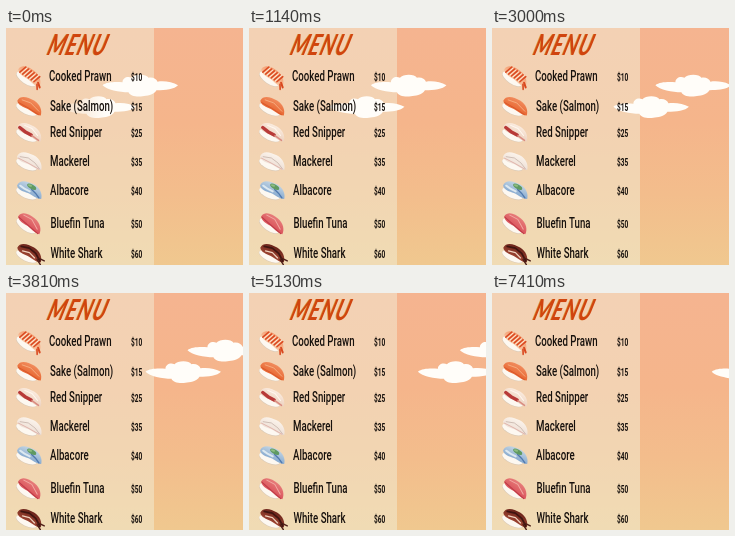
Recreate the animation shown at these times as an HTML page with a canvas. Size 237 by 237 pixels, loop 7470 ms.

```html
<!DOCTYPE html>
<html lang="en">
<head>
<meta charset="utf-8">
<title>Menu</title>
<style>
html, body { margin: 0; width: 100%; height: 100%; overflow: hidden; background: #f3bd90; }
canvas { display: block; width: 237px; height: 237px; }
</style>
</head>
<body>
<canvas id="stage" width="237" height="237"></canvas>
<script>
const SIZE = 237, LOOP = 7470, SPEED = 0.0223;
const ctx = document.getElementById('stage').getContext('2d');

const ITEMS = [
  { name: 'Cooked Prawn', price: '$10', x: 43, y: 53, tilt: 0.6, icon: prawn },
  { name: 'Sake (Salmon)', price: '$15', x: 44, y: 83, tilt: 0.45, icon: salmon },
  { name: 'Red Snipper', price: '$25', x: 44, y: 109, tilt: 0.45, icon: snapper },
  { name: 'Mackerel', price: '$35', x: 44, y: 138, tilt: 0.4, icon: mackerel },
  { name: 'Albacore', price: '$40', x: 44, y: 167, tilt: 0.4, icon: albacore },
  { name: 'Bluefin Tuna', price: '$50', x: 44.5, y: 200, tilt: 0.6, icon: tuna },
  { name: 'White Shark', price: '$60', x: 44.5, y: 230, tilt: 0.45, icon: shark }
];

function sky(c) {
  const g = c.createLinearGradient(0, 0, 0, SIZE);
  g.addColorStop(0, '#f5b490');
  g.addColorStop(0.4, '#f5b58b');
  g.addColorStop(0.7, '#f3bd8c');
  g.addColorStop(1, '#f0c88f');
  c.fillStyle = g;
  c.fillRect(0, 0, SIZE, SIZE);
  c.fillStyle = 'rgba(241,240,218,0.5)';
  c.fillRect(0, 0, 148, SIZE);
}

function cloud(c, x, y) {
  c.save();
  c.translate(x, y);
  // Fainter toward the left of the menu panel
  const g = c.createLinearGradient(50 - x, 0, 100 - x, 0);
  g.addColorStop(0, 'rgba(255,253,249,0.2)');
  g.addColorStop(1, '#fffdf9');
  c.fillStyle = g;
  c.beginPath();
  c.moveTo(0, 10.5);
  c.bezierCurveTo(4, 7, 13, 7, 20, 7.5);
  c.bezierCurveTo(20, 3, 25, 1, 29, 3);
  c.bezierCurveTo(32, -1, 44, -1, 46, 3);
  c.bezierCurveTo(50, 2, 54, 4, 55, 7);
  c.bezierCurveTo(61, 6, 70, 7, 75.5, 10.5);
  c.bezierCurveTo(72, 14.5, 63, 15.5, 54, 15.5);
  c.bezierCurveTo(51, 20.5, 44, 21, 40, 21.5);
  c.bezierCurveTo(34, 22.5, 27, 21, 26, 17.5);
  c.bezierCurveTo(17, 17.5, 4, 15, 0, 10.5);
  c.fill();
  c.restore();
}

function line(c, color, width, pts) {
  c.strokeStyle = color;
  c.lineWidth = width;
  c.beginPath();
  pts.forEach(([x, y], i) => i ? c.lineTo(x, y) : c.moveTo(x, y));
  c.stroke();
}

function oval(c, color, x, y, rx, ry, turn = 0) {
  c.fillStyle = color;
  c.beginPath();
  c.ellipse(x, y, rx, ry, turn, 0, Math.PI * 2);
  c.fill();
}

function rice(c) {
  oval(c, '#dccbb7', -1, 4.2, 11.4, 4.7);
  oval(c, '#fdf8f1', -1, 3.6, 11.2, 4.6);
}

function slab(c, top, bottom) {
  const g = c.createLinearGradient(0, -7, 0, 4);
  g.addColorStop(0, top);
  g.addColorStop(1, bottom);
  c.fillStyle = g;
  c.beginPath();
  c.moveTo(-13, 0);
  c.bezierCurveTo(-13, -7, -5, -8, 2, -7.5);
  c.bezierCurveTo(9, -7, 14, -2, 14.5, 3);
  c.bezierCurveTo(10, 5, 5, 3, 0, 2.8);
  c.bezierCurveTo(-5, 2.8, -10, 4, -13, 0);
  c.fill();
}

function stripes(c, color, width, from, to, step) {
  for (let x = from; x <= to; x += step) {
    line(c, color, width, [[x, -6], [x - 2, 1.6]]);
  }
}

function prawn(c) {
  rice(c);
  slab(c, '#f4976a', '#f8c8a4');
  stripes(c, '#da4a22', 1.5, -8, 9, 3.4);
  stripes(c, '#fdebd8', 0.9, -6.3, 9, 3.4);
  line(c, '#d9481f', 2, [[11, 0], [15, 3]]);
  line(c, '#d9481f', 1.6, [[11, 2], [14, 6]]);
}

function salmon(c) {
  rice(c);
  slab(c, '#f0895a', '#e8652f');
  line(c, '#f7b184', 0.8, [[-9, -3], [0, -4], [11, 0]]);
  line(c, '#d6552a', 0.8, [[-11, 1], [0, 1.6], [12, 3.2]]);
}

function snapper(c) {
  rice(c);
  slab(c, '#faeadd', '#ecd0bd');
  line(c, '#b83a38', 3.4, [[-10.5, -0.5], [-4, 1], [3, 1.2]]);
  line(c, '#d98b80', 1.4, [[4, 1.5], [12, 3]]);
  line(c, '#fff8f0', 1, [[-7, -4.5], [1, -5], [9, -1]]);
}

function mackerel(c) {
  rice(c);
  slab(c, '#faf2ea', '#eedfd5');
  line(c, '#c9b9b0', 0.8, [[-10, -1], [-2, -3], [6, -1], [13, 3]]);
  line(c, '#dfb3ab', 1, [[-11, 1], [0, 1.8], [12, 3.2]]);
}

function albacore(c) {
  rice(c);
  slab(c, '#bfd2e2', '#86a9cf');
  line(c, '#dce8f0', 2, [[-10, -1], [-5, 0], [1, 0.5]]);
  line(c, '#4f78ae', 1.3, [[2, -2], [7, 0], [12, 3]]);
  oval(c, '#5f9a62', 1, -4.5, 5, 2.2, 0.1);
  oval(c, '#8fbd80', -1, -5, 2.2, 1);
}

function tuna(c) {
  rice(c);
  slab(c, '#e67a78', '#d9515a');
  line(c, '#f2aaa3', 1, [[-9, -4], [0, -5], [10, 0]]);
  line(c, '#bd3a46', 1, [[-12, 0.5], [0, 2], [13, 3.5]]);
}

function shark(c) {
  rice(c);
  slab(c, '#6d251b', '#a04633');
  line(c, '#f0d3c0', 1.2, [[-7, 0.5], [0, -1], [7, 1.6]]);
  line(c, '#3f1511', 1.8, [[-10, -3], [-2, -5], [6, -3], [13, 2]]);
  line(c, '#4c1d17', 1.4, [[10, 0], [17, 0]]);
  line(c, '#4c1d17', 1.4, [[10, 2], [15, 5]]);
}

// One condensed style per kind of text
function label(c, text, x, y, font, color, narrow, slant = 0) {
  c.save();
  c.transform(narrow, 0, -slant, 1, x, y);
  c.font = font;
  c.fillStyle = color;
  c.fillText(text, 0, 0);
  c.restore();
}

function drawMenu(c) {
  const titleFont = 'italic bold 29px Lato, sans-serif';
  c.lineCap = c.lineJoin = 'round';
  c.letterSpacing = '1.5px';
  label(c, 'MENU', 39.2, 26.8, titleFont, '#dc9a3c', 0.67, 0.32);
  label(c, 'MENU', 40, 26.5, titleFont, '#d0440f', 0.67, 0.32);
  c.letterSpacing = '0px';
  for (const { name, price, x, y, tilt, icon } of ITEMS) {
    c.save();
    c.translate(23, y - 4.5);
    c.rotate(tilt);
    icon(c);
    c.restore();
    label(c, name, x, y, '500 14px Roboto, sans-serif', '#17110d', 0.69);
    label(c, price, 125, y, '600 11.5px Roboto, sans-serif', '#17110d', 0.57);
  }
}

function layer(paint) {
  const cv = document.createElement('canvas');
  cv.width = cv.height = SIZE;
  paint(cv.getContext('2d'));
  return cv;
}

const back = layer(sky), front = layer(drawMenu);
const start = performance.now();

function frame() {
  const t = (performance.now() - start) % LOOP;
  const x = 54.5 + SPEED * t;
  ctx.drawImage(back, 0, 0);
  cloud(ctx, x + 42, 46.7);
  cloud(ctx, x, 68.3);
  ctx.drawImage(front, 0, 0);
  requestAnimationFrame(frame);
}
frame();
</script>
</body>
</html>
```
